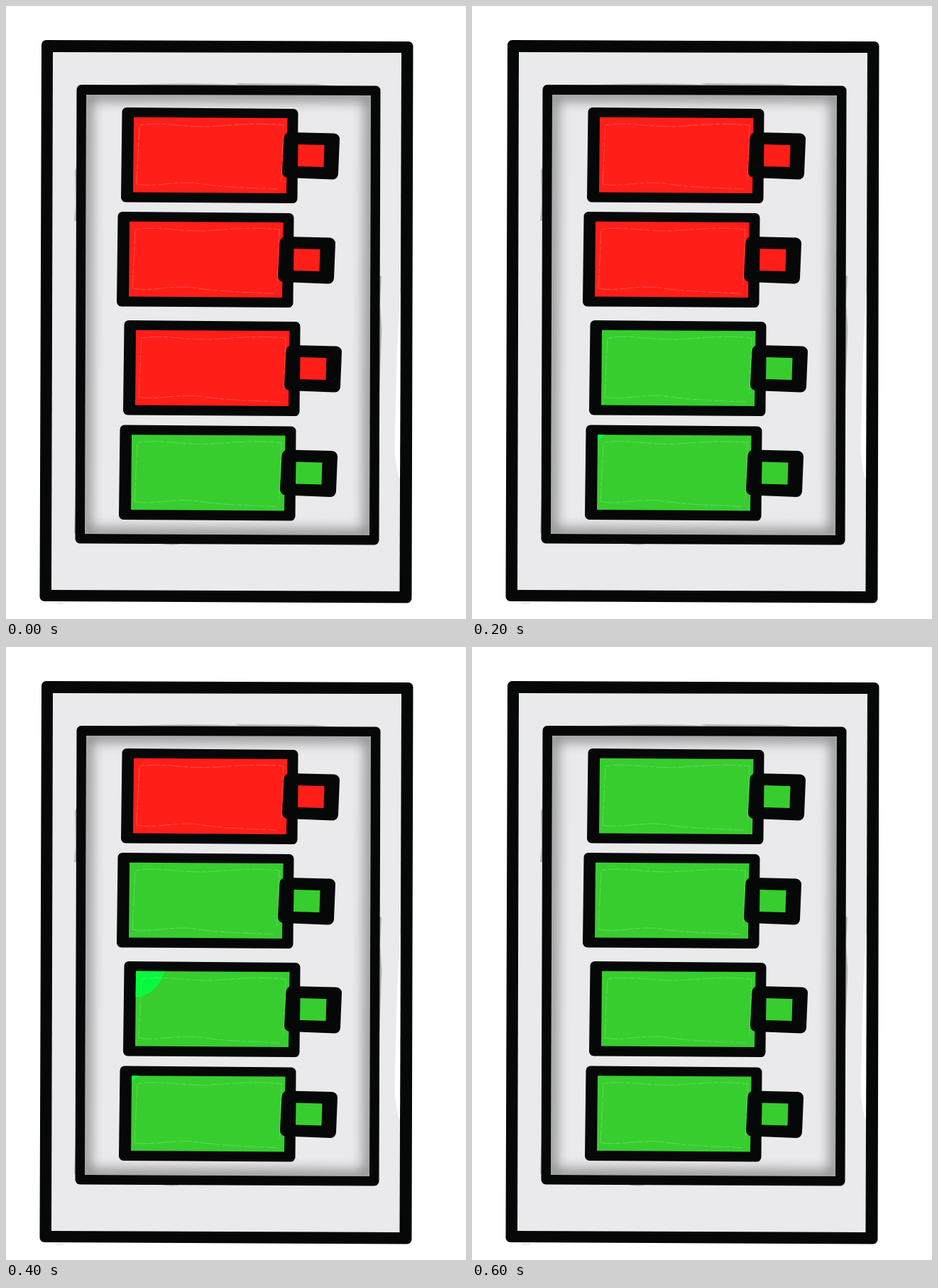
Write an HTML page that moves like this. It is 648 px wide and 864 px high and loops after 800 ms.

```html
<!DOCTYPE html>
<html lang="en">
<head>
<meta charset="utf-8">
<title>Charging batteries</title>
<style>
  html, body { margin: 0; width: 100%; height: 100%; overflow: hidden; background: #fff; }
  svg { display: block; width: 100vw; height: 100vh; }
  .ink { fill: #060707; stroke: #060707; stroke-width: 13; stroke-linejoin: round; }
  .cap { stroke-width: 16; }
  .panel { fill: #eaeaec; }
  .sketch { fill: none; stroke: #fff; stroke-width: .7; stroke-dasharray: 19 2 7 3; opacity: .3; }
</style>
</head>
<body>
<svg viewBox="0 0 648 864">
  <defs>
    <filter id="soft" x="-10%" y="-10%" width="120%" height="120%" color-interpolation-filters="sRGB"><feGaussianBlur stdDeviation="9"/></filter>
    <path id="well" d="M113 125 514 126 512 746 111 744Z"/>
    <clipPath id="wellClip"><use href="#well"/></clipPath>
    <path id="fill" d="M180 156.7 396.5 158 395 264 179 262.5Z"/>
    <clipPath id="fillClip"><use href="#fill"/></clipPath>
  </defs>

  <!-- case -->
  <path fill="#ededed" d="M66 840Q76 847 86 840Z"/>
  <path class="ink" d="M56.5 54.5 567 56.5 565 835 54 832.5Z"/>
  <path class="panel" d="M66 65 557 66 554.5 825 64 823Z"/>
  <path fill="#fff" d="M555.5 400Q552 450 550 520L547.5 628Q550 655 555 668Z"/>

  <!-- brush smudges around the tray -->
  <g fill="#b4b4b5">
    <path d="M160 112Q250 107 330 111L322 109 435 110 465 113Z"/>
    <path d="M101 222 97 232 98 280 96 303 101 303Z"/>
    <path d="M525 379 529 381 527 420 529.5 455 526 545 523 545Z"/>
    <path d="M99 670 96 742 100 746Z"/>
    <path d="M215 757Q238 762 246 757Z"/>
  </g>

  <!-- tray -->
  <path class="ink" d="M106 117.5 521 119 519 753 104 751Z"/>
  <use href="#well" class="panel"/>
  <g clip-path="url(#wellClip)">
    <use href="#well" fill="none" stroke="#000" stroke-width="14" opacity=".48" filter="url(#soft)"/>
  </g>
  <g id="cells"></g>
</svg>
<script>
  const STEP = 200, RED = '#ff1e18', GREEN = '#37cd2f';
  const offsets = [[0, 0], [-6, 147], [3, 300], [-3, 447.5]];

  const cell = ([x, y]) => `<g transform="translate(${x} ${y})">
    <path class="ink" d="M170 149.5 405 151.5 404 271.5 168.5 270Z"/>
    <g class="charge">
      <use href="#fill"/>
      <circle cx="175" cy="148" fill="#08f83f" clip-path="url(#fillClip)"/>
    </g>
    <path class="sketch" d="M184 251 188 168C220 163 240 170 285 170C320 168 350 164 391 168L388 246M184 251C210 256 240 246 270 250C310 256 340 256 383 258"/>
    <path class="ink cap" d="M399.5 186 462 187.5 460 236.5 397 234Z"/>
    <path class="charge" d="M411.5 195 448.5 196 447.5 227 411 226Z"/>
  </g>`;

  const root = document.getElementById('cells');
  root.innerHTML = offsets.map(cell).join('');
  const cells = [...root.children].map(g => ({
    parts: g.querySelectorAll('.charge'),
    glint: g.querySelector('circle')
  }));

  function draw(now) {
    const step = Math.floor(now / STEP) % 4;
    cells.forEach(({ parts, glint }, i) => {
      const color = i >= 3 - step ? GREEN : RED;
      parts.forEach(p => p.setAttribute('fill', color));
      const small = i === 3 && (step === 1 || step === 2);
      glint.setAttribute('r', i === 2 && step === 2 ? 46 : small ? 17 : 0);
    });
  }

  let start;
  function tick(now) {
    start ??= now;
    draw(now - start);
    requestAnimationFrame(tick);
  }
  draw(0);
  requestAnimationFrame(tick);
</script>
</body>
</html>
```
